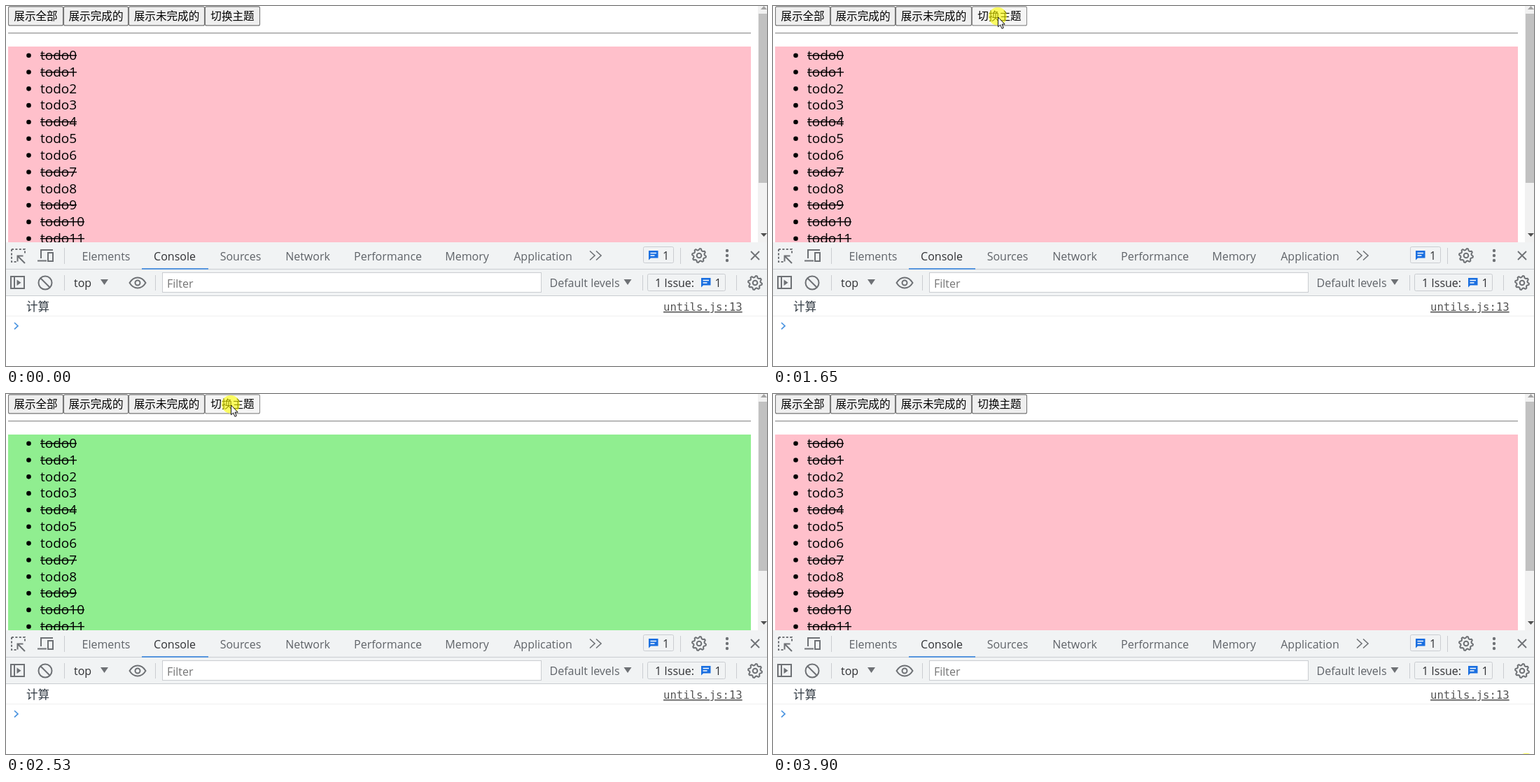
An HTML page for the animation above (3970 ms loop, 1087 by 515 pixels).

```html
<!DOCTYPE html>
<html lang="zh">
<head>
<meta charset="utf-8">
<title>Todo theme</title>
<style>
html, body { margin: 0; width: 100%; height: 100%; overflow: hidden; background: #fff; }
svg { display: block; width: 1087px; height: 515px; font: 16px "Open Sans", "Noto Sans", sans-serif; }
text { white-space: pre; }
.cjk { font-family: "Noto Sans CJK SC", "Noto Sans CJK", sans-serif; font-size: 15.6px; }
.mid { text-anchor: middle; }
.todo { font-size: 19px; }
.mono { font: 15.6px "DejaVu Sans Mono", monospace; text-decoration: underline; }
.btn rect { fill: #efefef; stroke: #767676; stroke-width: 1.1; }
.btn.hover rect { fill: #e5e5e5; stroke: #4f4f4f; }
.btn.active rect { fill: #f5f5f5; stroke: #8d8d8d; }
.icon { fill: none; stroke: #6e7175; stroke-width: 2; }
.dim { fill: #5f6368; }
</style>
</head>
<body>
<svg id="stage" viewBox="0 0 1087 515" xmlns="http://www.w3.org/2000/svg">
  <g id="page">
    <rect x="3" y="38" width="1061" height="1" fill="#9a9a9a"/>
    <rect x="3" y="39" width="1061" height="1" fill="#dcdcdc"/>
    <rect id="panel" x="3" y="58" width="1061" height="280"/>
    <rect x="1074" width="13" height="338" fill="#f1f1f1"/>
    <rect x="1075" y="11" width="12" height="242" fill="#c1c1c1"/>
    <path d="M1078 5l4.5-5 4.5 5z" fill="#a3a3a3"/>
    <path d="M1078 325h9l-4.5 5z" fill="#505050"/>
  </g>

  <g id="tools">
    <rect y="338" width="1087" height="177" fill="#fff"/>
    <rect y="338" width="1087" height="77" fill="#f1f3f4"/>
    <path d="M0 376.5H1087M0 414.5H1087" stroke="#cacdd1"/>
    <path d="M0 443.5H1087" stroke="#f0f0f0"/>
    <path d="M83.5 346v23M963.5 346v23M83.5 385v22M213.5 385v22M909.5 385v22M1043.5 385v22" stroke="#cacdd1"/>
    <rect x="194" y="375" width="95" height="2" fill="#5695dd"/>

    <g class="icon">
      <path d="M8 348H27V356M8 348V366H16" stroke-dasharray="3 2.4"/>
      <path d="M27 368L17 358M16.5 365.5V357.5H24.5"/>
      <path d="M50 361V349H67M45 364.5H58"/>
      <rect x="60" y="353" width="7" height="12"/>
      <path d="M834 350.5l7 6.5-7 6.5M843 350.5l7 6.5-7 6.5" stroke-width="1.6"/>
      <path d="M1064 351l12 12M1076 351l-12 12" stroke-width="1.8"/>
      <rect x="7" y="387" width="19" height="17"/>
      <path d="M12 387v17"/>
      <circle cx="56" cy="396" r="9.5"/>
      <path d="M49.5 389.5l13 13"/>
      <path d="M176.500 396Q181 388.500 188 388.500T199.500 396Q195 403.500 188 403.500T176.500 396Z"/>
      <circle cx="188" cy="396" r="3.500"/>
    </g>
    <path d="M15.500 391.500l6 4.200-6 4.200z" fill="#6e7175"/>
    <g fill="#6e7175">
      <circle cx="1030" cy="350" r="2.200"/><circle cx="1030" cy="357" r="2.200"/><circle cx="1030" cy="364" r="2.200"/>
      <path d="M135 391h11l-5.500 8zM882.500 391h11l-5.500 8z"/>
    </g>
    <g fill="#f1f3f4" stroke="#cacdd1">
      <rect x="910.500" y="344.500" width="43" height="23" rx="2"/>
      <rect x="916.500" y="383.500" width="111" height="24" rx="2"/>
      <rect x="223.500" y="381.500" width="541" height="28" fill="#fff"/>
    </g>
    <path d="M12 453l5 4.700-5 4.700" fill="none" stroke="#4a94e0" stroke-width="1.700"/>
  </g>

  <circle id="press" r="13" fill="#ff0" fill-opacity=".6"/>
  <path id="arrow" d="M.500.500V14.300L3.600 11.400 6 16.800 8.300 15.800 6 10.600H10.200Z" fill="#fff" stroke="#111" stroke-width="1"/>
</svg>
<script>
const NS = "http://www.w3.org/2000/svg";
const $ = id => document.getElementById(id);
const page = $("page"), tools = $("tools");

function add(parent, tag, attrs, text) {
  const el = document.createElementNS(NS, tag);
  for (const k in attrs) el.setAttribute(k, attrs[k]);
  if (text) el.textContent = text;
  return parent.appendChild(el);
}
const label = (parent, x, y, text, attrs) => add(parent, "text", { x, y, ...attrs }, text);

// Page: buttons and todo list
const buttons = [["展示全部", 3, 79], ["展示完成的", 82, 93], ["展示未完成的", 175, 109], ["切换主题", 284, 79]]
  .map(([text, x, w]) => {
    const el = add(page, "g", { class: "btn" });
    add(el, "rect", { x: x + .5, y: .9, width: w - 1, height: 27, rx: 2 });
    label(el, x + w / 2, 20.3, text, { class: "cjk mid" });
    return { el, x, w };
  });

const done = [0, 1, 4, 7, 9, 10, 11];
for (let i = 0; i < 12; i++) {
  const y = 77 + i * 23.82;
  add(page, "circle", { cx: 32.5, cy: y - 6.3, r: 3.3 });
  const item = label(page, 49, y, "todo" + i, { class: "todo" });
  if (done.includes(i)) add(page, "rect", { x: 49, y: Math.round(y - 7), width: i > 9 ? 63 : 52, height: 1.4 });
}

// Developer tools
const tabs = { Elements: 143, Console: 241, Sources: 335, Network: 431, Performance: 545.5, Memory: 658.5, Application: 767 };
for (const name in tabs)
  label(tools, tabs[name], 363.5, name, { class: "mid", fill: name === "Console" ? "#303134" : "#5f6368" });
label(tools, 97, 402, "top", { fill: "#303134" });
label(tools, 230, 402.5, "Filter", { fill: "#757575" });
label(tools, 776.5, 402, "Default levels", { class: "dim" });
label(tools, 927, 402, "1 Issue:", { fill: "#303134" });
label(tools, 938, 363, "1", { fill: "#303134" });
label(tools, 1012.5, 402, "1", { fill: "#303134" });
label(tools, 29, 436, "计算", { class: "cjk", style: "font-size:16.6px;font-weight:300", fill: "#303942" });
label(tools, 939, 436, "untils.js:13", { class: "mono", fill: "#545454" });

function gear(cx, cy) {
  let d = "";
  for (let i = 0; i < 32; i++) {
    const a = (i + .5) * Math.PI / 16, r = i % 4 < 2 ? 10 : 7.8;
    d += (i ? "L" : "M") + (cx + r * Math.cos(a)).toFixed(2) + " " + (cy + r * Math.sin(a)).toFixed(2);
  }
  add(tools, "path", { d: d + "Z", class: "icon", "stroke-linejoin": "round" });
  add(tools, "circle", { cx, cy, r: 3.3, class: "icon" });
}
gear(990, 357);
gear(1070, 396);

function chat(x, y) {
  add(tools, "path", { d: `M${x} ${y}h13.5v10.5h-10.500l-3 3z`, fill: "#1a6fe0" });
  add(tools, "path", { d: `M${x + 2.5} ${y + 3.5}h8.500m-8.500 3.500h6`, stroke: "#fff", "stroke-width": 1.4 });
}
chat(918, 350);
chat(993, 389);

// Pointer positions: time, x, y
const LOOP = 3970;
const path = [
  [0, -50, 600],
  [130, 944, 503], [200, 800, 372], [270, 520, 195], [340, 250, 82], [410, 123, 38], [480, 200, 16],
  [740, 208, 16], [810, 226, 16], [880, 250, 16], [950, 275, 16], [1020, 298, 16], [1090, 321, 16],
  [3010, 402, 52], [3080, 660, 196], [3150, 927, 363],
  [3220, 962, 424], [3290, 984, 460], [3360, 998, 486], [3430, 1009, 505], [3500, 1040, 540],
  [3900, 1076, 528]
];
// Mouse button: down and up in turn; each release switches the theme
const clicks = [1220, 1290, 1510, 1580, 1650, 1780, 1850, 1920, 2050, 2120, 2190,
  2260, 2330, 2400, 2530, 2660, 2730, 2800, 2870, 2940, 3900];

function draw(t) {
  const [, x, y] = path.filter(p => p[0] <= t).pop();
  const n = clicks.filter(c => c <= t).length;
  const down = n % 2 === 1;
  $("panel").setAttribute("fill", (n >> 1) % 2 ? "#90ee90" : "#ffc0cb");
  $("arrow").setAttribute("transform", `translate(${x} ${y - .5})`);
  $("press").setAttribute("transform", `translate(${x} ${y - 1.3})`);
  $("press").setAttribute("visibility", down ? "visible" : "hidden");
  for (const b of buttons) {
    const over = t >= 740 && y < 28 && x >= b.x && x < b.x + b.w;
    b.el.setAttribute("class", "btn" + (over ? down && n > 1 ? " active" : " hover" : ""));
  }
}

const start = performance.now();
function tick() {
  draw((performance.now() - start) % LOOP);
  requestAnimationFrame(tick);
}
tick();
</script>
</body>
</html>
```
